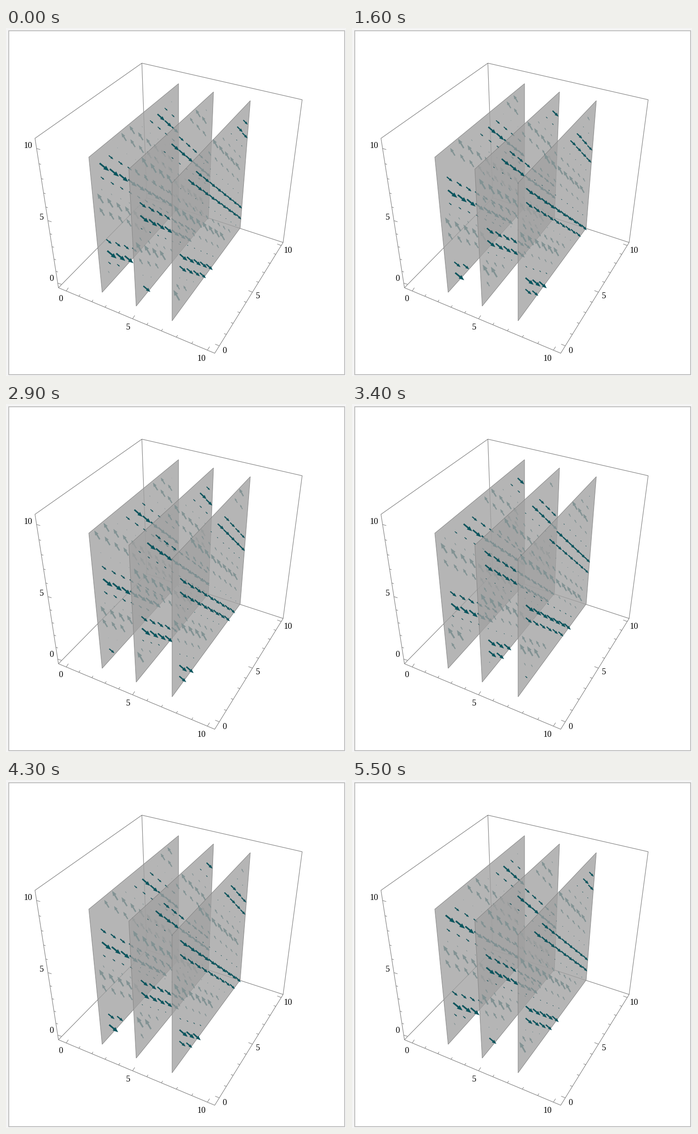
A matplotlib script for the animation above (6 s loop, 739 px wide and 757 px high).

```python
import numpy as np
import matplotlib.pyplot as plt
from matplotlib.animation import FuncAnimation
from matplotlib.collections import LineCollection, PolyCollection
from matplotlib.patches import Polygon, Rectangle

W, H, DPI = 739, 757, 64
PT = 72 / DPI                      # points per pixel
STEPS = 25                         # wave steps in one direction
CELLS = 11
CELL = 10 / CELLS                  # grid cell in axis units

LINE = "#777777"
TEAL, TEAL_EDGE = "#06565f", "#0b444c"

# x position and corners of each slice: top left, top right, bottom right, bottom left
SLICES = [
    (2.5, [(180, 281), (375, 121), (375, 391), (209, 575)]),
    (5.0, [(267, 307), (451, 139), (440, 412), (283, 605)]),
    (7.5, [(361, 337), (531, 158), (509, 435), (361, 637)]),
]

fig = plt.figure(figsize=(W / DPI, H / DPI), dpi=DPI, facecolor="#f4f4f4")
ax = fig.add_axes([0, 0, 1, 1])
ax.set_xlim(0, W)
ax.set_ylim(H, 0)
ax.axis("off")


def homography(corners):
    """Matrix taking grid cells (u, v) to pixels."""
    grid = [(0, CELLS), (CELLS, CELLS), (CELLS, 0), (0, 0)]
    rows, rhs = [], []
    for (u, v), (x, y) in zip(grid, corners):
        rows.append([u, v, 1, 0, 0, 0, -u * x, -v * x])
        rows.append([0, 0, 0, u, v, 1, -u * y, -v * y])
        rhs += [x, y]
    return np.append(np.linalg.solve(rows, rhs), 1).reshape(3, 3)


def draw_box():
    left_low, front, right_low = (114, 565), (453.7, 707.5), (602.3, 466.5)
    left_top, back_top, right_top = (63, 240), (295.3, 76.5), (643.7, 156)
    back_low = (306, 369.5)
    outline = [left_low, left_top, back_top, right_top, right_low, front, left_low]
    spokes = [[back_low, p] for p in (left_low, back_top, right_low)]
    ax.add_collection(LineCollection([outline] + spokes, colors=LINE,
                                     linewidths=1.1 * PT, zorder=1))


def draw_axis(start, end, mid, tick, labels):
    """Ticks for 0..10; mid is the fraction of the axis where 5 sits."""
    start, end, tick = map(np.array, (start, end, tick))
    weight = mid / (1 - mid)
    marks = []
    for n in range(11):
        t = n / 10
        p = (start * (1 - t) + end * weight * t) / (1 - t + weight * t)
        marks.append([p, p + tick * (1 if n % 5 == 0 else 0.55)])
    ax.add_collection(LineCollection(marks, colors=LINE,
                                     linewidths=1.0 * PT, zorder=1))
    for value, (x, y) in zip((0, 5, 10), labels):
        ax.text(x, y + 6, str(value), family="Liberation Serif", color="black",
                fontsize=18.5 * PT, ha="center", va="baseline", zorder=30)


def arrow(tail, vec):
    """Outline of one arrow with its head scaled to its length."""
    size = np.hypot(*vec)
    along = vec / size
    side = np.array([-along[1], along[0]])
    neck = 0.55 * size
    shaft_w = 0.055 * size + 0.15
    head_w = 0.175 * size
    shape = [(0, shaft_w), (neck, shaft_w), (neck, head_w), (size, 0),
             (neck, -head_w), (neck, -shaft_w), (0, -shaft_w)]
    return [tail + a * along + b * side for a, b in shape]


def full_vector(forward, u, p):
    """Arrow at full strength, shrinking with distance from the viewer."""
    d = u - 1
    if forward:
        return np.array([20 - 0.7 * d - 0.8 * p, 16.5 - 0.38 * d - 0.3 * p])
    return np.array([-14 + 0.4 * d + 0.7 * p, -23 + 0.65 * d + 0.4 * p])


class Slice:
    def __init__(self, index, x, corners):
        self.index, self.x = index, x
        m = homography(corners)
        self.points = []
        for u in range(CELLS - 1, 0, -1):
            for v in range(1, CELLS):
                px, py, w = m @ (u, v, 1)
                self.points.append((u, v, np.array([px / w, py / w])))
        z = 5 + 3 * index
        self.behind = self.arrows("#145e64", "#145e64", z)
        ax.add_patch(Polygon(corners, facecolor="#a1a1a1", edgecolor="none",
                             alpha=0.78, zorder=z + 1))
        ax.add_patch(Polygon(corners, fill=False, edgecolor="#858585",
                             linewidth=1.0 * PT, zorder=z + 1))
        self.ahead = self.arrows(TEAL, TEAL_EDGE, z + 2)

    def arrows(self, face, edge, z):
        group = PolyCollection([], facecolors=face, edgecolors=edge,
                               linewidths=0.35 * PT, zorder=z)
        ax.add_collection(group, autolim=False)
        return group

    def update(self, phase):
        ahead, behind = [], []
        for u, v, tail in self.points:
            c = np.cos(self.x + (u + v) * CELL - phase)
            strength = abs(c) ** 1.8
            if strength < 0.02:
                continue
            shape = arrow(tail, strength * full_vector(c > 0, u, self.index))
            (ahead if c > 0 else behind).append(shape)
        self.ahead.set_verts(ahead)
        self.behind.set_verts(behind)


ax.add_patch(Rectangle((5.5, 5.5), 730, 748, facecolor="white",
                       edgecolor="#bebebe", linewidth=2 * PT, zorder=0))
draw_box()
draw_axis((131, 572), (438, 700.3), 0.47, (4.5, -7),
          [(119, 588), (265, 650), (425, 718)])
draw_axis((463.7, 691.3), (598.6, 473.3), 0.535, (-9, -3.5),
          [(475, 701), (547, 582), (613, 483)])
draw_axis((112.4, 555), (66.4, 262), 0.464, (8, 2.5),
          [(99, 544), (78, 411), (48, 255)])
slices = [Slice(i, x, corners) for i, (x, corners) in enumerate(SLICES)]


def update(frame):
    # rest, run forward, turn, run back, rest
    step = np.clip(min(frame - 4, 55 - frame), 0, STEPS)
    phase = max(0, 0.4045 * step - 0.29)
    for s in slices:
        s.update(phase)
    return [g for s in slices for g in (s.behind, s.ahead)]


anim = FuncAnimation(fig, update, frames=60, interval=100, repeat=True,
                     repeat_delay=0, blit=False)
plt.show()
```
